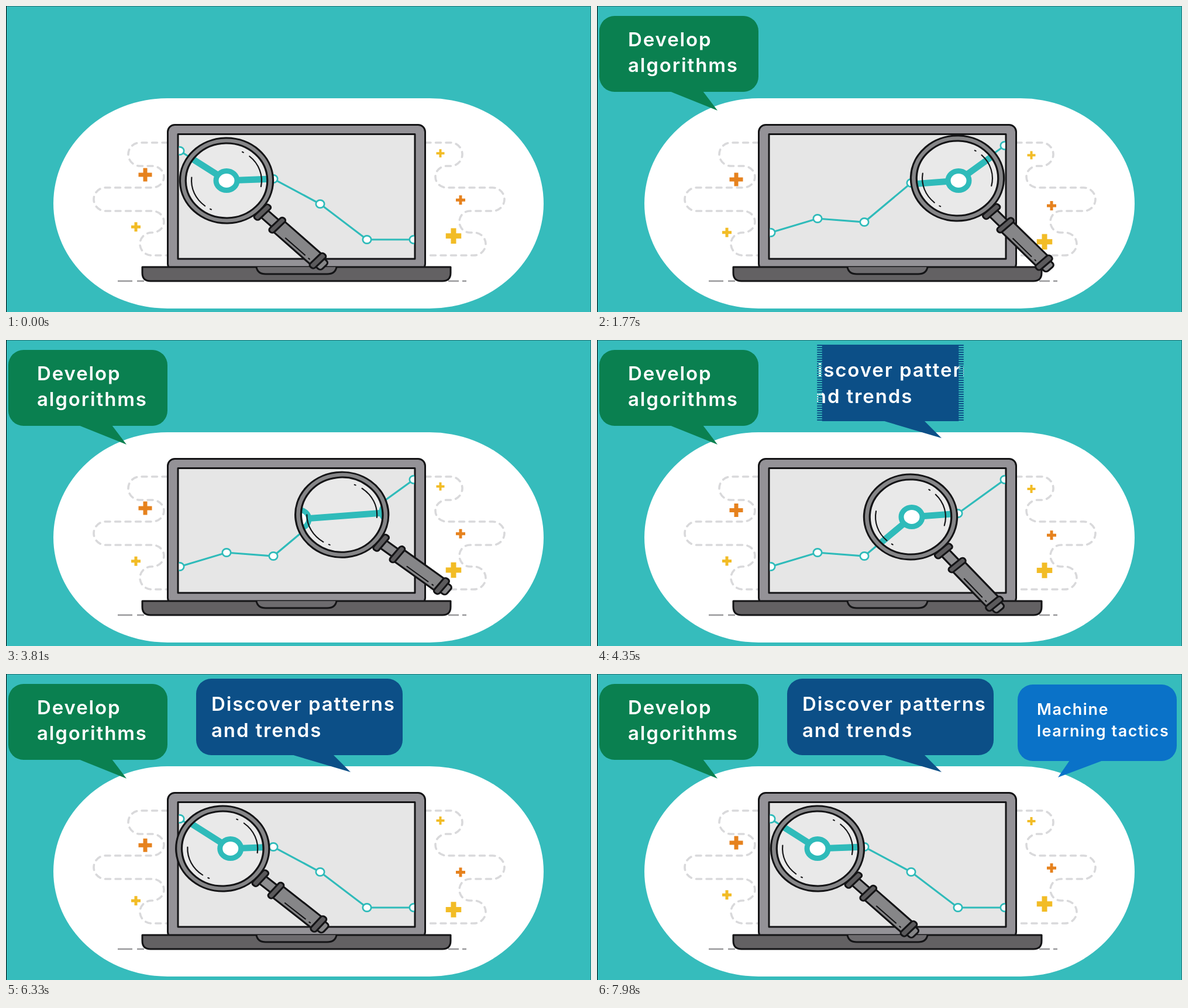
These frames come from a looping animation (1000 by 524 pixels, 8010 ms). An HTML page:

```html
<!DOCTYPE html>
<html lang="en">
<head>
<meta charset="utf-8">
<title>Data insights</title>
<style>
  html, body { margin: 0; width: 100%; height: 100%; overflow: hidden; background: #36bcbc; }
  svg { display: block; width: 100%; height: 100%; }
  text { font-family: Inter, "Open Sans", sans-serif; font-weight: 600; letter-spacing: .057em; fill: #fff; }
  .ink { stroke: #141416; stroke-width: 3; stroke-linejoin: round; }
  .thin { fill: none; stroke: #141416; stroke-width: 2; stroke-linecap: round; }
  .trail { fill: none; stroke: #d9d9db; stroke-width: 3.6; stroke-dasharray: 9 8.5; stroke-linecap: round; }
  .teal { stroke: #2fbbba; }
</style>
</head>
<body>
<svg viewBox="0 0 1000 524">
  <defs>
    <clipPath id="screen"><rect x="295.5" y="221" width="402.5" height="211"/></clipPath>
    <clipPath id="glass"><ellipse rx="70" ry="64"/></clipPath>
  </defs>
  <rect width="1000" height="524" fill="#36bcbc"/>
  <path d="M0 .5H1000M999.5 0V524" stroke="#1f7476"/>
  <path d="M.5 0V524" stroke="#000"/>
  <rect x="81" y="158" width="838" height="360" rx="195" ry="180" fill="#fff"/>

  <path class="trail" d="M276 234H229a20 20 0 0 0 0 40H250a20 18.5 0 0 1 0 37H170a20 20 0 0 0 0 40H250a20 18.5 0 0 1 0 37H249a20 19.5 0 0 0 0 39H276"/>
  <path class="trail" d="M717 234H760a20 20 0 0 1 0 40H753a19 18.5 0 0 0 0 37H832a20 20 0 0 1 0 40H793a18 18.5 0 0 0 0 37H800a20 19.5 0 0 1 0 39H717"/>
  <g id="pluses"></g>

  <path d="M191 471H216M224 471H236M756 471H774M780 471H787" stroke="#98989a" stroke-width="2.6"/>
  <rect class="ink" x="276.5" y="203.5" width="440" height="250" rx="12" fill="#949297"/>
  <rect class="ink" x="294" y="219.5" width="405" height="213.5" fill="#e6e6e6"/>
  <path class="ink" d="M233 447H760V457Q760 471 746 471H247Q233 471 233 457Z" fill="#636163"/>
  <path class="ink" d="M428 447Q430 459 444 459H549Q563 459 565 447" fill="#6d6b6e" stroke-width="2.6"/>

  <g clip-path="url(#screen)"><g id="chart"></g></g>

  <g id="lens">
    <ellipse rx="75" ry="69" fill="#e9e9e9"/>
    <g clip-path="url(#glass)"><g id="zoomed"></g></g>
    <g transform="scale(1.09 1)">
      <g id="tool">
        <rect class="ink" x="78" y="-8" width="32" height="16" fill="#8e8e90"/>
        <rect class="ink" x="200" y="-9.5" width="13" height="19" rx="5" fill="#868688"/>
        <rect class="ink" x="112" y="-12.5" width="84" height="25" fill="#868688"/>
        <rect class="ink" x="73" y="-16" width="10" height="32" rx="4" fill="#5b5a5c"/>
        <rect class="ink" x="105.500" y="-16" width="9.500" height="32" rx="4.500" fill="#5b5a5c"/>
        <rect class="ink" x="193" y="-15.500" width="10.500" height="31" rx="4.500" fill="#5b5a5c"/>
        <path class="thin" d="M135 7H177M185 7H187"/>
        <circle r="68.500" fill="none" stroke="#868688" stroke-width="9.500"/>
        <circle class="ink" r="73" fill="none" stroke-width="2.800"/>
        <circle class="ink" r="64" fill="none" stroke-width="2.600"/>
        <g id="glare"></g>
      </g>
    </g>
  </g>
  <g id="bubbles"></g>
</svg>

<script>
const LOOP = 8010, STEP = 30;
const $ = id => document.getElementById(id);
const clamp = u => Math.min(1, Math.max(0, u));

// x, mid y, size, thickness, phase of the lowest point, colour
const PLUSES = [
  [238, 292.4, 23, 7, .36, '#e6821e'],
  [222, 383.3, 16, 5, .53, '#f2bc26'],
  [742.5, 253, 14, 4, .27, '#f2bc26'],
  [777, 336.8, 16, 5, .42, '#e6821e'],
  [765, 399, 26.5, 9, .5, '#f2bc26']
];

const FALLING = [248, 299, 296, 339, 400, 400];
const RISING = [388, 364, 370, 303, 297, 239];

// time, values
const PLACE = [[500, 377, 299], [1300, 616, 295], [3450, 616, 295], [4150, 536, 303],
  [5400, 536, 303], [6200, 369, 299], [6700, 377, 299]];
const TILT = [[500, 43.8], [960, 62.7], [1400, 45.5], [1650, 46.8], [3450, 46.8], [3800, 38],
  [4250, 48.5], [5400, 48.5], [5800, 34], [6200, 40], [6700, 43.8]];

const BUBBLES = [
  { start: 1300, x: 4, y: 17, w: 272, h: 130, fill: '#0a8050', tail: '124 146L206 179L181 146',
    size: 33, tx: 53, lines: [['Develop', 69], ['algorithms', 113]] },
  { start: 4050, x: 325, y: 8, w: 353, h: 131, fill: '#0c4f87', tail: '488 138L589 168L559 138',
    size: 33, tx: 351, lines: [['Discover patterns', 63], ['and trends', 108]] },
  { start: 6800, x: 719, y: 18, w: 272, h: 131, fill: '#0a72c8', tail: '808 148L788 177L865 148',
    size: 27, tx: 752, lines: [['Machine', 70], ['learning tactics', 107]] }
];
const WIPE = 440, FIELD_LAG = 21;

function arc(r, from, to) {
  const at = deg => `${r * Math.cos(deg * Math.PI / 180)} ${r * Math.sin(deg * Math.PI / 180)}`;
  return `M${at(from)}A${r} ${r} 0 0 1 ${at(to)}`;
}

function build() {
  $('pluses').innerHTML = PLUSES.map(([, , s, w, , color]) =>
    `<path d="M${-s / 2} 0H${s / 2}M0 ${-s / 2}V${s / 2}" stroke="${color}" stroke-width="${w}"/>`).join('');
  $('glare').innerHTML = [[-93, -33], [-107, -105], [84, 142], [72, 74]].map(([a, b]) =>
    `<path class="thin" d="${arc(55, a, b)}"/>`).join('');
  const graph = (line, rx, ry, ring) =>
    `<path class="teal" fill="none" stroke-width="${line}"/>` + FALLING.map(() =>
      `<ellipse class="teal" fill="#fff" rx="${rx}" ry="${ry}" stroke-width="${ring}"/>`).join('');
  $('chart').innerHTML = graph(3.2, 7.2, 6.7, 2.7);
  $('zoomed').innerHTML = graph(11, 18, 16.5, 9);
  $('bubbles').innerHTML = BUBBLES.map((b, i) =>
    `<clipPath id="wipe${i}"><path/></clipPath><g clip-path="url(#wipe${i})">
      <rect x="${b.x}" y="${b.y}" width="${b.w}" height="${b.h}" rx="26" fill="${b.fill}"/>
      <path d="M${b.tail}Z" fill="${b.fill}"/>` +
    b.lines.map(([s, y]) => `<text x="${b.tx}" y="${y}" font-size="${b.size}">${s}</text>`).join('') +
    '</g>').join('');
}

function sample(keys, t) {
  const n = keys.findIndex(k => k[0] > t);
  if (n === 0) return keys[0].slice(1);
  if (n < 0) return keys[keys.length - 1].slice(1);
  const a = keys[n - 1], b = keys[n];
  const e = (1 - Math.cos(Math.PI * (t - a[0]) / (b[0] - a[0]))) / 2;
  return a.slice(1).map((v, i) => v + (b[i + 1] - v) * e);
}

// Pulls back before it goes.
function windUp(u) {
  u = clamp(u);
  const v = 1 - u;
  return -3 * v * v * u + 3 * v * u * u + u * u * u;
}

function chartPoints(t) {
  const back = t > 4500;
  const [from, to] = back ? [RISING, FALLING] : [FALLING, RISING];
  const start = back ? 5080 : 210;
  return from.map((y, i) =>
    [297 + 80 * i, y + (to[i] - y) * windUp((t - start - 100 * i) / 400)]);
}

function plot(group, points) {
  const [line, ...nodes] = group.children;
  line.setAttribute('d', 'M' + points.map(p => p.join(' ')).join('L'));
  nodes.forEach((node, i) => {
    node.setAttribute('cx', points[i][0]);
    node.setAttribute('cy', points[i][1]);
  });
}

// Opens from the middle; every other pair of rows lags behind.
function wipePath(b, t) {
  const mid = b.x + b.w / 2, full = b.w / 2 + 1;
  const half = ms => full * clamp(ms / WIPE);
  const lead = half(t - b.start + FIELD_LAG / 2), lag = half(t - b.start - FIELD_LAG / 2);
  const bar = (r, y, h) => `M${mid - r} ${y}h${2 * r}v${h}h${-2 * r}Z`;
  let d = bar(lag, 0, 190);
  if (lead > lag) for (let y = 0; y < 190; y += 4) d += bar(lead, y, 2);
  return d;
}

function draw(t) {
  PLUSES.forEach(([x, y, , , low], i) => {
    const bob = 5.2 * Math.cos(2 * Math.PI * (2 * t / LOOP - low));
    $('pluses').children[i].setAttribute('transform', `translate(${x} ${y + bob})`);
  });
  const points = chartPoints(t), [cx, cy] = sample(PLACE, t);
  plot($('chart'), points);
  plot($('zoomed'), points.map(([x, y]) => [2 * (x - cx), 2 * (y - cy)]));
  $('lens').setAttribute('transform', `translate(${cx} ${cy})`);
  $('tool').setAttribute('transform', `rotate(${sample(TILT, t)[0]})`);
  BUBBLES.forEach((b, i) => $('wipe' + i).firstChild.setAttribute('d', wipePath(b, t)));
}

build();
const began = performance.now();
function tick() {
  const t = (performance.now() - began) % LOOP;
  draw(Math.floor(t / STEP) * STEP);
  requestAnimationFrame(tick);
}
tick();
</script>
</body>
</html>
```
